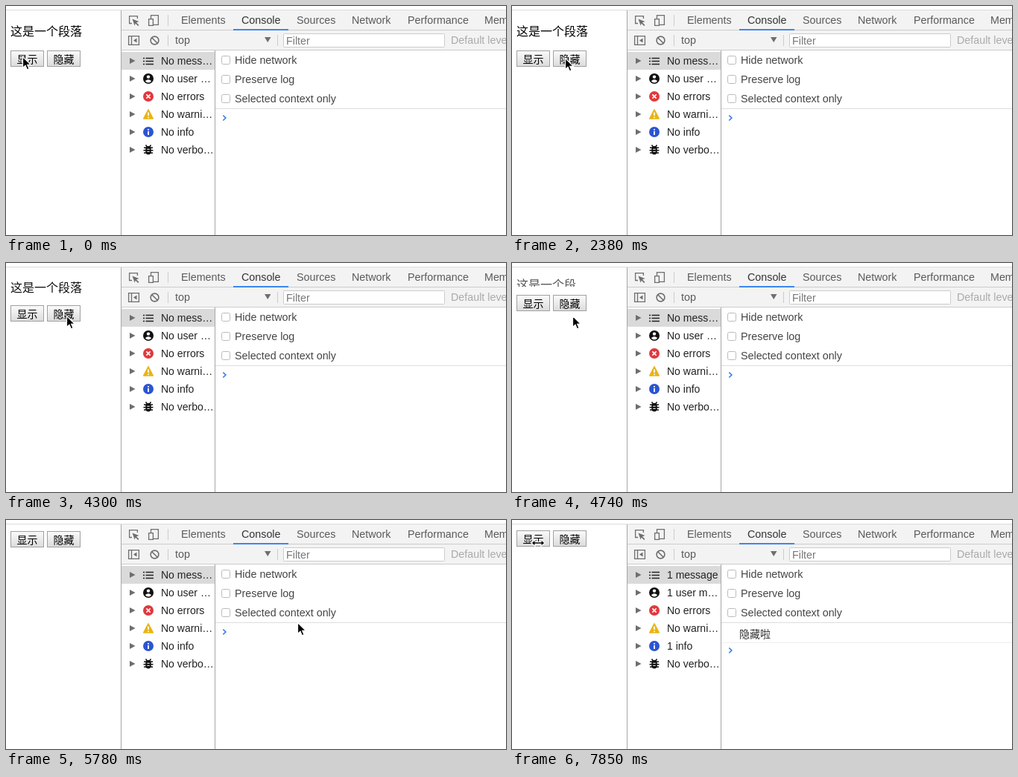
An HTML page that plays this animation: 671x309 px, repeating every 8 s.

```html
<!DOCTYPE html>
<html lang="zh-CN">
<head>
<meta charset="utf-8">
<style>
html, body { margin: 0; width: 100%; height: 100%; overflow: hidden; background: #fff; }
svg, p, .btn { position: absolute; margin: 0; }
svg { left: 0; top: 0; font: 14.3px "Liberation Sans", Arial, sans-serif; }
p, .btn, .zh { font-family: "Noto Sans CJK SC", "Noto Sans CJK", sans-serif; }
p { left: 6px; width: 140px; font-size: 16px; line-height: 22px; overflow: hidden; color: #000; }
.btn { box-sizing: border-box; width: 45px; height: 22px; border: 1px solid #a0a0a0; font-size: 14px;
  line-height: 20px; text-align: center; color: #000; background: linear-gradient(#fafafa, #dcdcdc); }
.btn.down { background: #aaa; }
</style>
</head>
<body>
<svg id="tools" width="671" height="309" fill="#303030">
  <path d="M0 5.5H671" stroke="#ddd"/>
  <path d="M155 6H671V60H155Z" fill="#f3f3f3"/>
  <path d="M155 32.5H671M155 59.5H671" stroke="#ccc"/>
  <path d="M305 31H379V33H305Z" fill="#3b86f0"/>
  <path d="M155 62H280V86H155Z" fill="#dadada"/>
  <path d="M154.5 6V309M280.5 60V309" stroke="#a6a6a6"/>
  <path d="M281 138.5H671" stroke="#ddd"/>
  <path d="M217.5 12V27M217.5 39V54M364.5 39V54" stroke="#ccc"/>

  <!-- toolbar icons -->
  <g fill="none" stroke="#6e6e6e" stroke-width="1.3">
    <path d="M169 23.5H165.6V13.6H176.4V17"/>
    <path d="M194.5 17V12.6H204.4V25.4H198M191.6 17.6H197.4V26.4H191.6Z"/>
    <path d="M164.6 40.6H178.4V52.4H164.6ZM168.5 41V52"/>
    <circle cx="199.5" cy="46.5" r="5.4" stroke-width="1.6"/>
    <path d="M195.7 42.7L203.3 50.3" stroke-width="1.6"/>
  </g>
  <path d="M169.5 17.5L178.5 21L175 22.3 178.4 25.7 177.2 26.9 173.8 23.5 172.6 26.6Z" fill="#6e6e6e"/>
  <path d="M175.5 43.5V49.5L171 46.5Z" fill="#6e6e6e"/>
  <path d="M347 42H355.5L351.2 49Z" fill="#6e6e6e"/>
  <rect x="372.5" y="37.5" width="216" height="18" rx="1" fill="#fff" stroke="#ccc"/>

  <!-- sidebar icons -->
  <path d="M184 70.5H186M187.5 70.5H198M184 74.5H186M187.5 74.5H198M184 78.5H186M187.5 78.5H198" stroke="#222" stroke-width="1.7"/>
  <circle cx="191" cy="98" r="7" fill="#111"/>
  <circle cx="191" cy="95.6" r="2.2" fill="#fff"/>
  <path d="M186.8 101.2Q191 97.4 195.2 101.2Q191 105.6 186.8 101.2Z" fill="#fff"/>
  <circle cx="191" cy="122" r="7" fill="#e0393e"/>
  <path d="M188.4 119.4L193.6 124.6M193.6 119.4L188.4 124.6" stroke="#fff" stroke-width="1.6"/>
  <path d="M191 139.8L197.4 152H184.6Z" fill="#e9b414" stroke="#e9b414" stroke-width="1.4" stroke-linejoin="round"/>
  <path d="M191 143.5V148M191 149.4V151.2" stroke="#fff" stroke-width="1.7"/>
  <circle cx="191" cy="170" r="7" fill="#2b55d0"/>
  <path d="M191 166V167.8M191 169V174" stroke="#fff" stroke-width="1.8"/>
  <rect x="187.3" y="189" width="7.4" height="11.5" rx="3.7" fill="#111"/>
  <path d="M185 191.2H197M184.5 194.7H197.5M185 198.2H197M187.5 187.5L189.3 190M194.5 187.5L192.7 190" stroke="#111" stroke-width="1.5"/>
  <path d="M189.3 193.3H192.7M189.3 196.4H192.7" stroke="#fff"/>

  <g id="log">
    <text class="zh" x="305" y="159" font-size="14">隐藏啦</text>
    <path d="M281 165.5H671" stroke="#eee"/>
  </g>
  <path id="prompt" d="M291.3 147.5L294.8 151L291.3 154.5" fill="none" stroke="#3b7de8" stroke-width="1.7"/>
  <path id="caret" d="M305 144H306V160H305Z" fill="#000"/>
</svg>
<p id="para">这是一个段落</p>
<div class="btn" id="show" style="left:6px">显示</div>
<div class="btn" id="hide" style="left:55px">隐藏</div>
<svg width="671" height="309">
  <g id="mouse" stroke="#fff" stroke-width="1.2">
    <path id="arrow" d="M.5 .5V15.5L4 12.3 6.3 17.8 9 16.7 6.7 11.4H11.3Z"/>
    <path id="resize" d="M-9 0L-4 -4.5V-1.3H4V-4.5L9 0L4 4.5V1.3H-4V4.5Z"/>
  </g>
</svg>
<script>
const $ = id => document.getElementById(id);
const LOOP = 8000, STEP = LOOP / 54;
const HIDE_AT = 3970, HIDE_MS = 2000;

function add(tag, attrs, text = '') {
  const el = document.createElementNS('http://www.w3.org/2000/svg', tag);
  for (const k in attrs) el.setAttribute(k, attrs[k]);
  el.textContent = text;
  $('tools').insertBefore(el, $('log'));
  return el;
}
const label = (x, y, text, fill = '#303030', size = 14.3) =>
  add('text', { x, y, fill, 'font-size': size }, text);

[[235, 'Elements'], [316, 'Console'], [390, 'Sources'], [464, 'Network'], [539, 'Performance'], [642, 'Memory']]
  .forEach(([x, name]) => label(x, 24, name, name === 'Console' ? '#333' : '#5a5a5a'));
label(227, 51, 'top', '#5a5a5a');
label(376, 52, 'Filter', '#777');
label(597, 51, 'Default levels', '#aaa');

['Hide network', 'Preserve log', 'Selected context only'].forEach((name, i) => {
  const y = 73 + 26 * i;
  add('rect', { x: 289.5, y: y - 5.5, width: 11, height: 11, rx: 2, fill: '#fff', stroke: '#bbb' });
  label(307, y + 5, name, '#444');
});

const before = ['No mess…', 'No user …', 'No errors', 'No warni…', 'No info', 'No verbo…'];
const after = ['1 message', '1 user m…', 'No errors', 'No warni…', '1 info', 'No verbo…'];
const rows = before.map((name, i) => {
  const y = 74 + 24 * i;
  add('path', { d: `M166 ${y - 4}L173.5 ${y}L166 ${y + 4}Z`, fill: '#6e6e6e' });
  return label(208, y + 5, name, '#222', 14);
});

// pointer path: step, x, y
const path = [[0, 22, 68], [2, 22, 68], [6, 70, 70], [9, 70, 70], [10, 71, 70], [17, 71, 70], [24, 81, 71],
  [36, 81, 71], [40, 494, 160], [41, 460, 160], [44, 382, 168], [49, 39, 32], [53, 33, 30], [54, 33, 30]];

function pointer(n) {
  const i = path.findIndex(k => k[0] > n), [a, ax, ay] = path[i - 1], [b, bx, by] = path[i];
  const f = (n - a) / (b - a);
  return [ax + (bx - ax) * f, ay + (by - ay) * f];
}

const toggle = (id, on) => $(id).style.display = on ? '' : 'none';

function draw(now) {
  const n = Math.floor(now % LOOP / STEP), t = n * STEP;

  // the paragraph's size, margins and opacity shrink together
  const p = Math.min(1, Math.max(0, (t - HIDE_AT) / HIDE_MS));
  const left = 0.5 + Math.cos(Math.PI * p) / 2, done = p === 1;
  const top = 6 + Math.max(8, 16 * left), style = $('para').style;
  style.top = top + 'px';
  style.width = 140 * left + 'px';
  style.height = 22 * left + 'px';
  style.opacity = left;
  toggle('para', !done);
  $('show').style.top = $('hide').style.top = Math.round(top + 38 * left) + 'px';
  $('hide').classList.toggle('down', n === 26);

  toggle('log', done);
  $('prompt').setAttribute('transform', `translate(0 ${done ? 25 : 0})`);
  rows.forEach((row, i) => row.textContent = (done ? after : before)[i]);
  toggle('caret', t > 1850 && t < 3800 && (t - 1850) % 1000 < 500);

  const [x, y] = pointer(n);
  $('mouse').setAttribute('transform', `translate(${Math.round(x)} ${Math.round(y)})`);
  toggle('arrow', n < 49);
  toggle('resize', n >= 49);
}

const start = performance.now();
function tick() {
  draw(performance.now() - start);
  requestAnimationFrame(tick);
}
tick();
</script>
</body>
</html>
```
